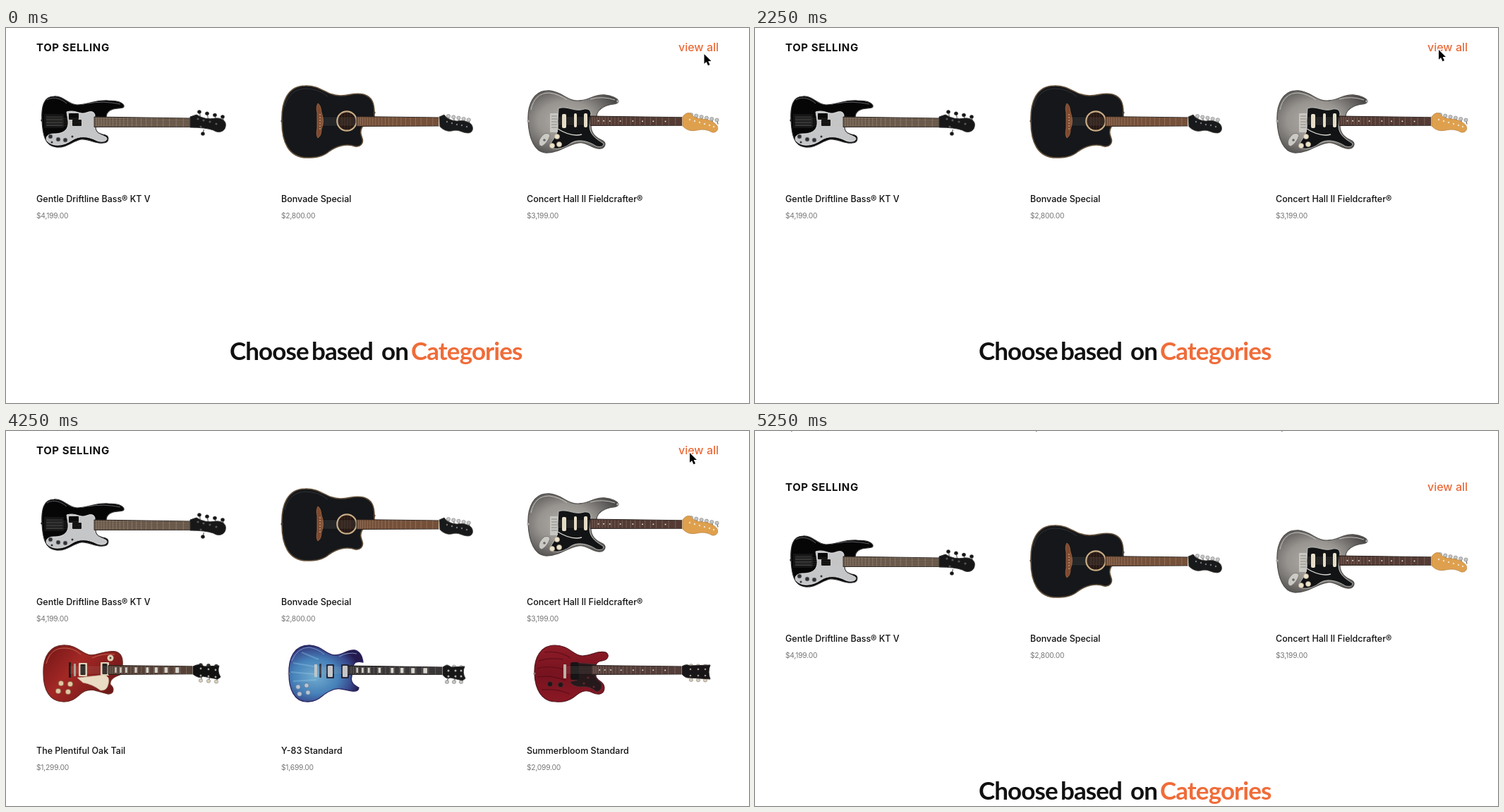
An HTML page that plays this animation: 1053x532 px, repeating every 6000 ms.

```html
<!DOCTYPE html>
<html lang="en">
<head>
<meta charset="utf-8">
<title>Top selling guitars</title>
<style>
  html, body { margin: 0; width: 100%; height: 100%; overflow: hidden; background: #fff; }
  svg { display: block; width: 100%; height: 100%; }
  text { font-family: Inter, "Open Sans", sans-serif; fill: #111; }
  .section { font-size: 15px; font-weight: 700; letter-spacing: .6px; }
  .link { font-size: 16px; font-weight: 500; fill: #ea6936; }
  .name { font-size: 12.5px; font-weight: 500; }
  .price { font-size: 10.3px; letter-spacing: -.25px; fill: #777; }
  .headline { font: 700 35px Lato, sans-serif; letter-spacing: -.9px; }
  .accent { fill: #f06c39; }
</style>
</head>
<body>
<svg viewBox="0 0 1053 532" preserveAspectRatio="none">
  <defs>
    <radialGradient id="silver" cx=".42" cy=".48" r=".62">
      <stop offset="0" stop-color="#b3b0ab"/><stop offset=".5" stop-color="#979490"/><stop offset="1" stop-color="#4b4948"/>
    </radialGradient>
    <linearGradient id="cherry" x2="1" y2=".6">
      <stop offset="0" stop-color="#701516"/><stop offset=".45" stop-color="#a32825"/><stop offset="1" stop-color="#701718"/>
    </linearGradient>
    <radialGradient id="ocean" cx=".36" cy=".55" r=".62">
      <stop offset="0" stop-color="#72add0"/><stop offset=".5" stop-color="#4681b9"/><stop offset=".8" stop-color="#38488c"/><stop offset="1" stop-color="#241a4d"/>
    </radialGradient>
    <linearGradient id="wine" x2="0" y2="1">
      <stop offset="0" stop-color="#8e1c27"/><stop offset=".5" stop-color="#77131f"/><stop offset="1" stop-color="#8a1824"/>
    </linearGradient>
  </defs>
  <g id="page"></g>
  <path id="cursor" d="M0 0V13.8L3.1 11 5.5 16.2 8 15.1 5.6 10H10Z" fill="#000" stroke="#fff" stroke-width="2" paint-order="stroke"/>
</svg>
<script>
const LOOP = 6000;
const COLUMNS = [43, 390, 738];

const shape = (d, fill, stroke = 'none', width = 1) =>
  `<path d="${d}" fill="${fill}" stroke="${stroke}" stroke-width="${width}" stroke-linejoin="round"/>`;
const box = (x, y, w, h, fill, r = 1) =>
  `<rect x="${x}" y="${y}" width="${w}" height="${h}" rx="${r}" fill="${fill}"/>`;
const dots = (points, r, fill, stroke = 'none') =>
  points.map(([x, y]) => `<circle cx="${x}" cy="${y}" r="${r}" fill="${fill}" stroke="${stroke}" stroke-width=".7"/>`).join('');
const label = (x, y, kind, content) => `<text x="${x}" y="${y}" class="${kind}">${content}</text>`;
const lines = (d, color, width) => shape(d, 'none', color, width);

// Fingerboard with equal-tempered frets, inlays and strings reaching the bridge.
function neck({ x, end, y, h, drop = 0, wood, inlay, bridge, strings = 6 }) {
  const len = end - x, scale = len / (1 - 2 ** (-22 / 12));
  const fretX = n => end - scale * (1 - 2 ** (-n / 12));
  const topAt = px => y + drop * (px - x) / len;
  let out = shape(`M${x} ${y}L${end} ${y + drop + 1}V${y + drop + h - 1}L${x} ${y + h}Z`, wood, '#28211d', .9);
  let frets = '';
  for (let n = 1; n < 22; n++) frets += `M${fretX(n)} ${topAt(fretX(n)) + 1}v${h - 2}`;
  out += lines(frets, 'rgba(220,210,195,.42)', .6);
  for (const n of [3, 5, 7, 9, 12, 15, 17, 19]) {
    const cx = (fretX(n) + fretX(n - 1)) / 2, cy = topAt(cx) + h / 2;
    const w = (fretX(n - 1) - fretX(n)) * .62;
    if (inlay === 'block') out += box(cx - w / 2, cy - h * .3, w, h * .6, '#d9d8d1', .4);
    if (inlay === 'dot') out += dots([[cx, cy]], 1, '#e2ddd3');
  }
  let wires = '';
  for (let i = 0; i < strings; i++) {
    const offset = 2 + (h - 4) * i / (strings - 1);
    wires += `M${bridge} ${y + offset}L${end} ${y + drop + offset}`;
  }
  return out + lines(wires, 'rgba(195,185,170,.42)', .45) + box(end - 1, y + drop, 1.6, h, '#d8d0c0', 0);
}

// Tuning pegs at evenly spaced places along a line.
function pegs(x, y, dx, dy, count, fill, stem = 4) {
  let out = '';
  for (let i = 0; i < count; i++) {
    const px = x + dx * i, py = y + dy * i;
    out += lines(`M${px} ${py}l1.5 ${stem}`, '#77736e', 1.3) +
      `<ellipse cx="${px}" cy="${py}" rx="2.7" ry="2.5" fill="${fill}" stroke="#555" stroke-width=".4"/>`;
  }
  return out;
}

function bass() {
  return shape('M51 131C50 112 53 97 68 97C82 96 88 109 101 109C115 109 125 102 145 103C155 103 165 105 167 110C168 115 160 113 152 115C145 117 142 121 142 126L127 140C127 149 133 150 141 152C147 154 146 163 138 163C126 165 117 156 106 158C93 161 87 170 71 169C55 167 52 151 51 131Z', '#060607', '#303033', 1.2) +
    lines('M58 102C68 96 79 101 86 107M116 107Q138 103 162 108', '#77777a', .8) +
    shape('M86 119C99 115 105 124 114 120Q124 116 126 123V140C126 151 136 151 142 155C146 160 137 163 129 160C115 153 104 153 94 159C81 168 66 169 58 160C55 154 60 150 68 150C83 150 89 143 88 132Z', '#c5c6c8', '#eeeeef', .8) +
    box(54, 122, 28, 20, '#151516') + lines('M57 126h23M57 130h23M57 134h23M57 138h23', '#555', .7) +
    box(89, 121, 14, 9, '#090909') + box(94, 130, 13, 9, '#090909') +
    dots([[63, 154], [74, 158], [84, 159]], 3, '#303134', '#858689') + dots([[94, 154], [65, 162]], 1.5, '#333') +
    neck({ x: 125, end: 262, y: 126, h: 14.5, drop: 1, wood: '#645344', bridge: 57, strings: 5 }) +
    dots([[51, 131]], 1.7, '#222') +
    pegs(274, 119, 11, 2.3, 4, '#161617', 7) + pegs(279, 150, 1, 0, 1, '#161617', -6) +
    shape('M261 126L270 123Q282 131 297 128C307 127 313 133 311 140C310 147 301 150 294 145Q283 141 261 141Z', '#171718', '#343437') +
    dots([[272, 129], [280, 131], [289, 133], [298, 136], [276, 140]], 1.6, '#56575a');
}

function acoustic() {
  return shape('M391 133C390 105 399 82 424 82C446 81 454 96 474 96C488 96 493 91 506 94C519 97 522 107 522 120V130L505 140C501 147 503 151 505 157C507 164 502 169 495 168C482 163 468 168 458 175C449 183 438 184 427 184C400 184 391 161 391 133Z', '#15171a', '#64513b', 1.6) +
    lines('M395 112Q401 87 424 86Q443 86 456 97', '#303237', 1) +
    `<circle cx="483" cy="132" r="13.7" fill="#241814" stroke="#c9ad87" stroke-width="2.2"/>` +
    lines('M476 121v22M480 120v24M484 120v24M488 121v22', '#4c3024', .7) +
    shape('M442 107Q446 109 447 119Q452 132 447 144Q447 153 442 156Q439 152 441 142V120Q439 112 442 107Z', '#804a30', '#aa714b', .7) +
    dots([123, 127, 131, 135, 139, 143].map(y => [445, y]), .8, '#e4cda6') +
    neck({ x: 497, end: 614, y: 125.5, h: 14, drop: .5, wood: '#6d452d', bridge: 446 }) +
    dots([[391, 132], [522, 120]], 1.6, '#4a4036') +
    pegs(627, 125, 7.2, 1.3, 5, '#c6c8c9', 7) +
    shape('M614 126L621 123Q626 131 639 132Q649 130 656 134C664 138 663 149 655 149C646 149 642 143 632 146Q623 148 615 140Z', '#17191b', '#4d4a42', .8) +
    dots([[625, 133], [632, 135], [639, 137], [646, 138], [653, 140]], 1.2, '#77797a');
}

function doubleCut() {
  return shape('M740 132C739 108 748 88 770 89C788 90 796 105 813 103C828 102 833 94 848 95C859 96 867 100 868 104C867 109 857 107 849 111C840 115 837 120 837 126L829 139C829 149 836 156 846 160C852 164 848 172 840 171C829 170 823 161 810 163C796 165 785 177 766 177C749 177 741 156 740 132Z', 'url(#silver)', '#53504e', 1.3) +
    lines('M744 116Q749 92 770 92Q784 94 795 102M828 101Q845 96 863 102', '#c4c2bd', 1) +
    shape('M783 114C794 110 804 118 815 116Q828 112 829 121L827 139C827 152 838 158 847 164Q847 170 837 168C825 160 811 157 801 163Q789 173 775 171Q768 168 775 159Q784 148 782 132Z', '#121315', '#d1d1cb', .8) +
    box(771, 121, 11, 27, '#c8c6c1') + lines('M773 125h8M773 129h8M773 133h8M773 137h8M773 141h8', '#6c6a66', .7) +
    [[788, 122, 6], [805, 121, 4], [819, 121, 5]].map(([x, y, w]) => box(x, y, w, 20, '#e8dfc9', 2)).join('') +
    shape('M756 166Q753 158 763 150Q770 148 771 153Q767 164 759 168Z', '#cbc9c4', '#65615e', .7) + dots([[763, 159]], 1.8, '#666') +
    dots([[781, 154], [784, 165], [774, 167]], 3.6, '#ece2ca', '#aaa08b') +
    lines('M782 143Q801 155 816 151', '#d4d3cd', 1.4) +
    neck({ x: 828, end: 959, y: 125, h: 13.5, drop: .8, wood: '#482d27', inlay: 'dot', bridge: 775 }) +
    dots([[740, 132], [867, 104]], 1.8, '#aaa') +
    pegs(971, 123, 7.3, 1.5, 6, '#c4c5c4', 6) +
    shape('M959 126Q964 119 970 121Q975 129 987 129Q998 130 1004 135C1012 140 1009 149 1001 148Q991 142 979 145Q967 148 959 139Z', '#dfa04e', '#b98542', .8) +
    dots([[969, 130], [976, 132], [983, 134], [990, 136], [997, 138], [1003, 140]], 1.2, '#eee2c7');
}

function singleCut() {
  return shape('M53 344C52 320 63 303 84 304C102 304 108 318 121 318C134 317 142 311 155 313C163 315 166 322 165 333L164 345C154 348 146 352 148 360C154 365 153 373 145 373C133 371 122 364 112 369C102 373 99 384 82 384C61 384 53 366 53 344Z', 'url(#cherry)', '#6b2922', 1.3) +
    lines('M57 330Q63 307 84 308Q96 308 106 317M122 322Q137 315 154 317', '#c36251', 1) +
    shape('M101 350L139 346Q148 348 145 359Q143 369 134 368Q122 359 109 357Z', '#eadbc4', '#b6a28c', .7) +
    [[103, 329], [134, 328]].map(([x, y]) => box(x, y, 12, 19, '#dfd2b9') + box(x + 2.5, y + 2, 7, 15, '#282323')).join('') +
    box(89, 328, 3, 22, '#201c1b') + box(96, 330, 3, 18, '#aaa296') +
    dots([[78, 358], [91, 359], [74, 369], [88, 370]], 3.8, '#e2c7a1', '#76563c') +
    dots([[148, 322]], 4.5, '#dfcfb3') + dots([[148, 322]], 1.4, '#52433c') +
    neck({ x: 145, end: 265, y: 332.5, h: 13, drop: .3, wood: '#49332a', inlay: 'block', bridge: 91 }) +
    pegs(276, 332, 11, .7, 3, '#302d2a', 5) + pegs(276, 354, 11, .8, 3, '#d9cfb9', -5) +
    shape('M265 334Q274 329 281 334L302 333Q299 341 304 349L300 352L279 348Q274 352 265 345Z', '#111112', '#292929') +
    dots([[276, 337], [287, 338], [297, 339], [276, 347], [287, 348], [297, 349]], 1.4, '#a7a39b');
}

function hornedBlue() {
  return shape('M401 345C400 321 409 304 430 304C449 305 453 318 466 318C480 318 483 309 495 311C502 313 505 320 506 328Q494 325 492 334L490 348Q487 358 500 364Q500 370 491 369C479 368 472 362 459 369C447 374 444 384 428 384C408 385 401 365 401 345Z', 'url(#ocean)', '#2b235e', 1.3) +
    lines('M405 326Q413 307 430 307Q442 309 451 317M472 320Q485 313 497 316', '#8aaad2', .8) +
    lines('M407 329l35 6M404 342l34 3M407 355l33-2M419 314l24 10', 'rgba(160,210,235,.32)', 2) +
    [[454, 331], [475, 331]].map(([x, y]) => box(x, y, 11, 20, '#24273a') + box(x + 2, y + 2, 7, 16, '#c5c7cb')).join('') +
    box(437, 331, 4, 18, '#c0c5c9') + box(444, 330, 3, 20, '#363b4e') +
    dots([[414, 363], [426, 361], [416, 373], [428, 371]], 3.3, '#b9c5d1', '#566c91') +
    neck({ x: 486, end: 619, y: 333, h: 12.5, drop: 1, wood: '#29272b', inlay: 'block', bridge: 440 }) +
    dots([[401, 344]], 1.5, '#777') +
    pegs(625, 334, 10, .5, 3, '#c5c5c3', 5) + pegs(625, 356, 10, 0, 3, '#c5c5c3', -5) +
    shape('M619 335Q625 330 631 335L650 334Q646 342 651 351L647 354L630 350Q624 353 619 346Z', '#171718', '#353535') +
    dots([[627, 340], [637, 340], [645, 340], [627, 348], [637, 348], [645, 348]], 1.5, '#b3b2ae');
}

function doubleWine() {
  return shape('M749 345C748 321 758 304 778 304C798 304 804 319 817 319C831 319 837 311 850 314C856 318 853 325 845 326Q836 327 836 334V348C838 356 847 354 848 364C848 374 839 375 831 371C819 365 812 372 804 378C797 383 790 385 779 384C759 384 750 366 749 345Z', 'url(#wine)', '#571820', 1.2) +
    lines('M755 326Q770 321 790 324M753 337Q771 332 790 338M753 349Q774 346 793 354M759 367Q780 365 799 373M763 314Q784 311 800 322', 'rgba(55,5,18,.48)', 1.2) +
    shape('M812 329L835 331V348Q838 354 844 358Q846 368 837 370Q827 361 815 363Q804 363 799 356L810 353Z', '#26191b', '#56333a', .7) +
    box(800, 328, 12, 25, '#171416', 3) + box(790, 331, 4, 20, '#bbb1a7') +
    dots([[771, 359], [786, 360]], 3.7, '#1d1718', '#622d35') + dots([[825, 350], [833, 363], [819, 358]], 1.6, '#63272f') +
    neck({ x: 830, end: 958, y: 332.5, h: 13, drop: .5, wood: '#48302d', inlay: 'dot', bridge: 793 }) +
    dots([[749, 344]], 1.6, '#8e817a') +
    pegs(971, 333, 10, .2, 3, '#d6cbb8', 5) + pegs(971, 353, 10, .3, 3, '#d6cbb8', -5) +
    shape('M958 334Q964 330 969 333L998 332Q994 342 998 352L969 350Q963 351 958 345Z', '#171517', '#302b2b') +
    dots([[970, 338], [981, 338], [991, 338], [970, 347], [981, 347], [991, 347]], 1.3, '#9e968a');
}

const product = (column, y, art, name, price) =>
  art() + label(COLUMNS[column], y, 'name', name) + label(COLUMNS[column], y + 22.7, 'price', price);

const page = document.getElementById('page');
const cursor = document.getElementById('cursor');

page.innerHTML =
  COLUMNS.map(x => box(x + 8, -52, 1.6, 1, '#8b8b8b', 0)).join('') +
  label(43, 32.5, 'section', 'TOP SELLING') +
  label(953, 32.5, 'link', 'view all') +
  product(0, 246.8, bass, 'Gentle Driftline Bass® KT V', '$4,199.00') +
  product(1, 246.8, acoustic, 'Bonvade Special', '$2,800.00') +
  product(2, 246.8, doubleCut, 'Concert Hall II Fieldcrafter®', '$3,199.00') +
  `<g id="more">${
    product(0, 457.8, singleCut, 'The Plentiful Oak Tail', '$1,299.00') +
    product(1, 457.8, hornedBlue, 'Y-83 Standard', '$1,699.00') +
    product(2, 457.8, doubleWine, 'Summerbloom Standard', '$2,099.00')
  }</g>` +
  `<text id="headline" class="headline" y="471"><tspan x="317">Choose</tspan><tspan x="433">based</tspan><tspan x="532">on</tspan><tspan x="574" class="accent">Categories</tspan></text>`;

const more = document.getElementById('more');
const headline = document.getElementById('headline');
const show = (node, visible) => node.setAttribute('visibility', visible ? 'visible' : 'hidden');

const CURSOR_STOPS = [[989.5, 37], [973, 25], [972, 24.5], [970, 31], [969, 31]];

function render(time) {
  const t = time % LOOP;
  const expanded = (t >= 1250 && t < 2250) || (t >= 3250 && t < 4750);
  const stop = CURSOR_STOPS[Math.min(Math.floor(t / 250), CURSOR_STOPS.length - 1)];
  show(more, expanded);
  show(headline, !expanded);
  show(cursor, t < 5000);
  cursor.setAttribute('transform', `translate(${stop})`);
  page.setAttribute('transform', `translate(0 ${t >= 5250 ? 52 : 0})`);
}

function tick() {
  render(performance.now());
  requestAnimationFrame(tick);
}
tick();
</script>
</body>
</html>
```
